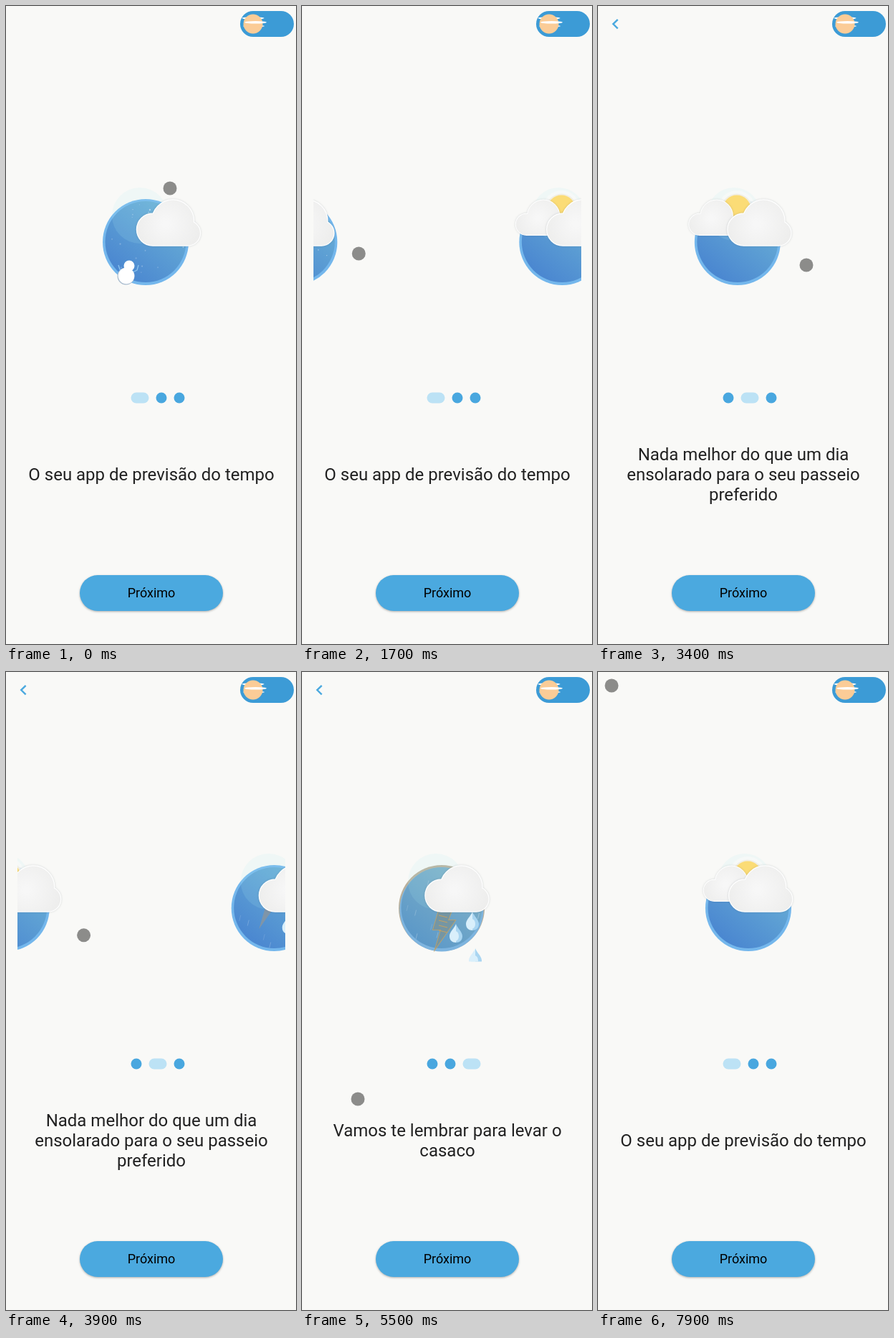
Write an HTML page with a canvas that moves like this. It is 405x889 px and loops after 8 s.

```html
<!DOCTYPE html>
<html lang="pt-BR">
<head>
<meta charset="utf-8">
<title>Previsão do tempo</title>
<style>
  html, body { margin: 0; width: 100%; height: 100%; overflow: hidden; background: #f9f9f7; }
  body { position: relative; font-family: Roboto, sans-serif; }
  canvas { position: absolute; left: 0; top: 0; }
  #title {
    position: absolute; left: 0; top: 603px; width: 406px; height: 100px;
    display: flex; align-items: center; justify-content: center;
    white-space: pre; text-align: center; font-size: 24px; line-height: 28px; color: #212121;
  }
  #next {
    position: absolute; left: 103px; top: 793px; width: 200px; height: 50px; border-radius: 25px;
    background: #4ba9df; box-shadow: 0 1px 3px rgba(0, 0, 0, .3);
    font-size: 18px; line-height: 50px; text-align: center; color: #000;
  }
</style>
</head>
<body>
<div id="title"></div>
<div id="next">Próximo</div>
<canvas id="stage" width="405" height="889"></canvas>
<script>
const c = document.getElementById('stage').getContext('2d');
const title = document.getElementById('title');
const LOOP = 8000, STEP = 100, PAGE = 374, TAU = Math.PI * 2;
const TITLES = [
  'O seu app de previsão do tempo',
  'Nada melhor do que um dia\nensolarado para o seu passeio\npreferido',
  'Vamos te lembrar para levar o\ncasaco'
];

const mod = (a, n) => ((a % n) + n) % n;
const rand = n => mod(Math.sin(n * 12.9898) * 43758.5453, 1);
const ramp = (t, start, length) => Math.min(1, Math.max(0, (t - start) / length));
const ease = (t, start, length) => {
  const p = ramp(t, start, length);
  return p * p * (3 - 2 * p);
};

// Two swipes forward, then two taps on the back arrow
const scrollAt = t => PAGE *
  (ease(t, 1380, 600) + ease(t, 3387, 1000) - ramp(t, 6900, 300) - ramp(t, 7888, 300));
const pageAt = t => (t >= 1900) + (t >= 4600) - (t >= 6900) - (t >= 7900);

// Pointer moves: start, length, end x, end y
const MOVES = [
  [100, 800, 275, 345], [1190, 700, 36, 345], [2650, 700, 291, 361],
  [3400, 830, 11, 370], [4500, 950, 78, 595], [5500, 850, 19, 19]
];
const pointerAt = t => MOVES.reduce(([x, y], [start, length, endX, endY]) => {
  const p = ease(t, start, length);
  return [x + (endX - x) * p, y + (endY - y) * p];
}, [229, 254]);

function disc(x, y, r, fill, ry = r) {
  c.beginPath();
  c.ellipse(x, y, r, ry, 0, 0, TAU);
  c.fillStyle = fill;
  c.fill();
}
function pill(x, y, w, h, fill) {
  c.beginPath();
  c.roundRect(x, y, w, h, h / 2);
  c.fillStyle = fill;
  c.fill();
}
function line(points, color, width) {
  c.beginPath();
  points.forEach(p => c.lineTo(...p));
  c.strokeStyle = color;
  c.lineWidth = width;
  c.stroke();
}

// x, y: left end of the flat base
function cloud(x, y, s = 1, lobe = 22) {
  const p = new Path2D();
  for (const [cx, cy, r] of [[lobe, -lobe, lobe], [50, -34, 29], [71, -17, 17]]) {
    p.moveTo(cx + r, cy);
    p.arc(cx, cy, r, 0, TAU);
  }
  p.rect(lobe, -24, 71 - lobe, 24);
  c.save();
  c.translate(x, y);
  c.scale(s, s);
  c.shadowColor = 'rgba(70, 80, 90, .22)';
  c.shadowBlur = 3;
  c.strokeStyle = '#fff';
  c.lineWidth = 2.4;
  c.stroke(p);
  c.shadowColor = 'transparent';
  const g = c.createRadialGradient(40, -30, 4, 44, -30, 48);
  g.addColorStop(0, '#f7f7f7');
  g.addColorStop(1, '#ededec');
  c.fillStyle = g;
  c.fill(p);
  c.restore();
}

function globe(flash) {
  const g = c.createLinearGradient(158, 378, 232, 285);
  g.addColorStop(0, flash ? '#5a97c8' : '#4985d0');
  g.addColorStop(1, flash ? '#80b2c8' : '#69afd6');
  disc(195, 329, 60, flash ? '#b9b09c' : '#74b7ec');
  if (flash) disc(195, 331, 58.5, '#7db4df');
  disc(195, 328.5, 56.5, g);
}
const glow = (x, y, r) => disc(x, y, r, 'rgba(180, 238, 236, .13)');

function flakes(t, count, length) {
  c.save();
  c.beginPath();
  c.arc(195, 329, 56, 0, TAU);
  c.clip();
  for (let i = 1; i <= count; i++) {
    const x = 142 + 106 * rand(i);
    const y = 275 + mod(110 * rand(i + 40) + t * (.012 + length * .006), 110);
    const color = `rgba(255, 255, 255, ${.15 + .3 * rand(i + 80)})`;
    if (length) line([[x, y], [x - length / 4, y + length]], color, .8);
    else disc(x, y, .5 + .7 * rand(i + 9), color);
  }
  c.restore();
}

function snowPage(t) {
  globe();
  glow(187, 292, 39);
  flakes(t, 26, 0);
  disc(167.5, 376.6, 12, '#a9bccf');
  disc(172, 362, 8.2, '#4f8fd0');
  line([[157, 361], [159, 367], [163, 370]], '#8cc4ee', 1.3);
  line([[185, 361], [183, 368], [177, 371]], '#8cc4ee', 1.3);
  disc(168, 376, 11.3, '#fff');
  disc(172, 362, 7.5, '#fff');
  cloud(172.5 + 10.5 * Math.cos(t / 3400 * TAU), 333.5);
}

function sunPage(t) {
  const sway = Math.sin((t - 1900) / 8800 * TAU);
  globe();
  glow(190, 290, 37);
  disc(194, 283, 26, 'rgba(246, 249, 248, .88)');
  disc(194, 283, 21.5, '#f1eee4');
  disc(194, 283, 19.5, '#fbdc76');
  cloud(130 - 3 * sway, 319, .77, 19);
  cloud(175 + 7.5 * sway, 333.5);
}

function drop(x, y) {
  c.save();
  c.translate(x, y);
  for (const side of [-1, 1]) {
    c.beginPath();
    c.moveTo(0, -13);
    c.bezierCurveTo(side * 2, -7, side * 9, -2, side * 9, 4);
    c.bezierCurveTo(side * 9, 10, side * 5, 13, 0, 13);
    c.fillStyle = side < 0 ? '#d9effb' : '#a9d5f1';
    c.fill();
  }
  disc(-1, 4, 5, '#d9effb', 7);
  c.restore();
}

// Slides out from behind the cloud and back
function bolt(t, flash) {
  const hidden = 1 - Math.exp(-(((t - 5500) / 1900) ** 2));
  c.save();
  c.beginPath();
  c.rect(135, 328, 120, 76);
  c.clip();
  c.translate(-20 * hidden, -64 * hidden);
  line([[194, 322], [213, 322], [204, 346], [214, 346], [186, 386], [194, 359], [183, 359], [194, 322]],
    flash ? '#c6a161' : '#8295a6', 1.6);
  c.fillStyle = flash ? '#7596a3' : '#7f95a8';
  c.fill();
  if (flash) for (let y = 339; y < 362; y += 7) line([[191, y], [203, y + 3]], '#c6a161', 1);
  c.restore();
}

function stormPage(t) {
  const flash = Math.abs(t - 5500) <= 100, fall = .06 * (t - 5500);
  globe(flash);
  glow(187, 292, 39);
  flakes(t, 14, 8);
  bolt(t, flash);
  drop(215, 320 + mod(44 + fall, 84));
  drop(238, 320 + mod(27 + fall, 84));
  drop(242, 320 + mod(78 + fall, 168));
  cloud(172 + 2.5 * Math.cos((t - 4300) / 5400 * TAU), 333.5);
}

function toggle() {
  pill(327, 7, 75, 36, '#3c9bd6');
  disc(345, 17, 15.5, '#fff', 1.6);
  disc(346, 28, 15, '#fff', 1.5);
  disc(345, 25, 13.5, '#fbcc97');
  disc(348.5, 22.7, 15.5, '#fff', 1.8);
}

function draw(t) {
  const page = pageAt(t), scroll = scrollAt(t);
  if (title.textContent !== TITLES[page]) title.textContent = TITLES[page];
  c.clearRect(0, 0, 405, 889);

  toggle();
  if (page) line([[27.6, 18.8], [21.2, 25.1], [27.6, 31.4]], '#4ba9df', 2.4);

  c.save();
  c.beginPath();
  c.rect(16, 240, 374, 163.5);
  c.clip();
  [snowPage, sunPage, stormPage].forEach((paint, i) => {
    const x = i * PAGE - scroll;
    if (Math.abs(x) > PAGE) return;
    c.save();
    c.translate(x, 0);
    paint(t);
    c.restore();
  });
  c.restore();

  for (let i = 0, x = 174.5; i < 3; i++) {
    const w = i === page ? 25 : 15;
    pill(x, 538.5, w, 15, i === page ? '#bce2f5' : '#49a7df');
    x += w + 10;
  }

  disc(...pointerAt(t), 9.5, 'rgba(0, 0, 0, .44)');
}

const start = performance.now();
function tick() {
  const t = (performance.now() - start) % LOOP;
  draw(Math.floor(t / STEP) * STEP);
  requestAnimationFrame(tick);
}
tick();
</script>
</body>
</html>
```
